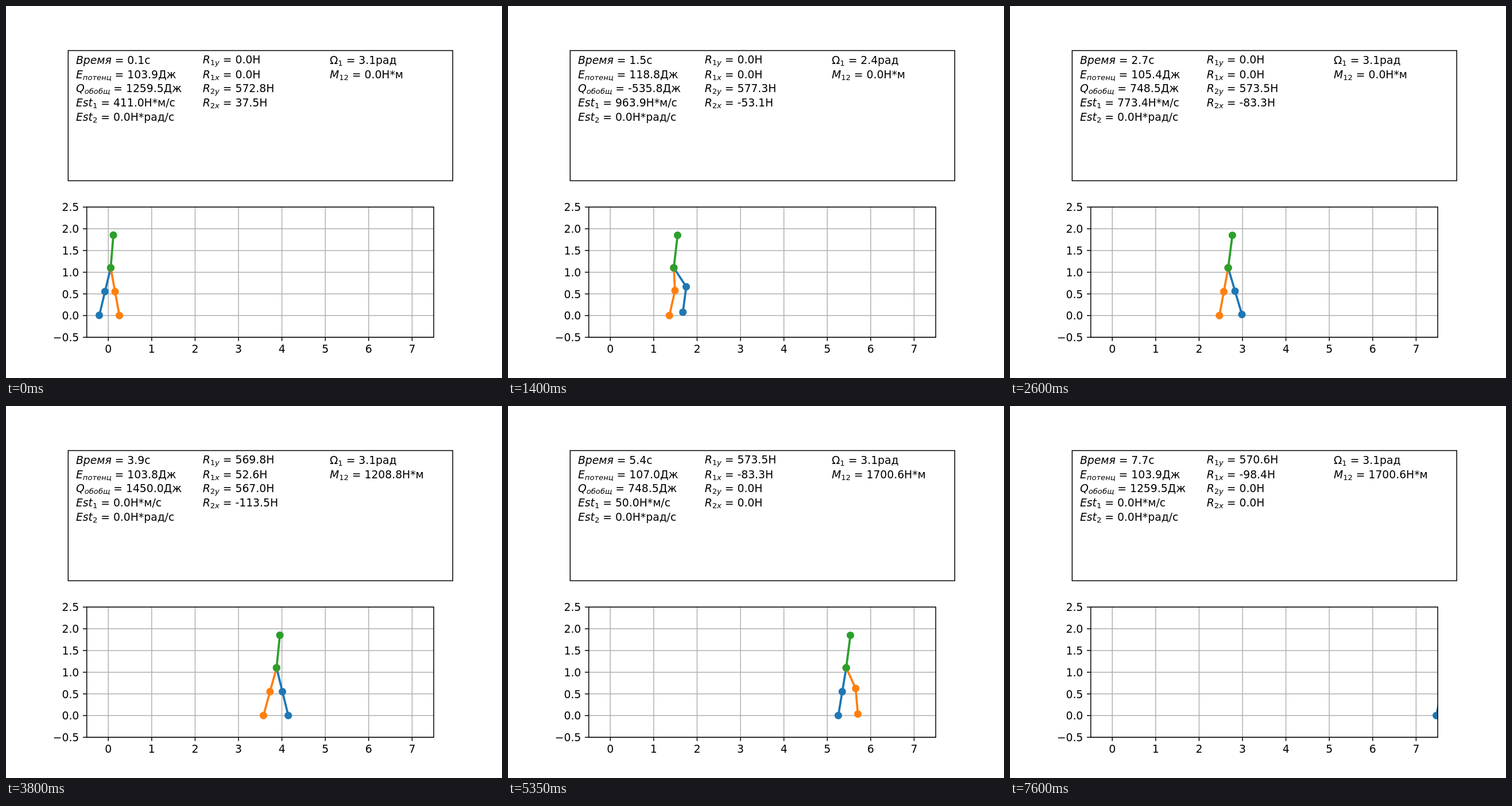
Write an HTML page that moves like this. It is 864 px wide and 648 px high and loops after 7650 ms.

```html
<!DOCTYPE html>
<html lang="ru">
<head>
<meta charset="utf-8">
<title>Модель ходьбы</title>
<style>
  html, body { margin: 0; width: 100%; height: 100%; overflow: hidden; background: #fff; }
  svg { display: block; }
  text { font: 18.75px "DejaVu Sans", sans-serif; white-space: pre; }
  .i { font-style: italic; }
  .sub { font-size: 13.125px; }
  .frame { fill: none; stroke: #000; stroke-width: 1.5; }
  .tick { stroke: #000; stroke-width: 1.5; }
  .grid { stroke: #b0b0b0; stroke-width: 1.5; }
  .limb polyline { fill: none; stroke: currentColor; stroke-width: 3.75; stroke-linejoin: round; }
  .limb circle { fill: currentColor; }
</style>
</head>
<body>
<svg width="864" height="648" viewBox="0 0 864 648">
  <defs><clipPath id="plot"><rect x="140.4" y="349.9" width="604.8" height="226.8"/></clipPath></defs>
  <rect class="frame" x="108.3" y="77.6" width="669.9" height="226.8"/>
  <g id="readout"></g>
  <g id="axes"></g>
  <g id="walker" clip-path="url(#plot)"></g>
  <rect class="frame" x="140.7" y="350.3" width="604.4" height="226.8"/>
</svg>
<script>
const STEP = 50, FRAMES = 153;
const STRIDE_FRAMES = 22, HALF = 11;   // the legs swap roles every HALF frames
const SCALE = 75.6, X0 = 178.2, Y0 = 539.2;
const SPEED = 1.0057, HIP_Y = 1.1, STRIDE = 1.1063;
const THIGH = 0.5228, SHIN = 0.592, TRUNK = 0.755;

const px = x => X0 + x * SCALE;
const py = y => Y0 - y * SCALE;
const wave = (x, period) => Math.cos(2 * Math.PI * x / period);
const byId = id => document.getElementById(id);

function add(parent, tag, attrs = {}) {
  const el = document.createElementNS('http://www.w3.org/2000/svg', tag);
  for (const key in attrs) el.setAttribute(key, attrs[key]);
  return parent.appendChild(el);
}

// Foot going from one foothold to the next; u is the part of the swing done
function foot(from, u) {
  u = Math.min(1, Math.max(0, u));
  const ramp = Math.min(1, u / 0.4);
  const advance = (u + (1 - Math.cos(Math.PI * u)) / 2) / 2;
  return [from + STRIDE * advance, 0.097 * Math.sin(Math.PI * u) * ramp * ramp * (3 - 2 * ramp)];
}

// Knee bends forward; a leg out of reach is drawn straight
function knee(hip, ankle) {
  const dx = ankle[0] - hip[0], dy = ankle[1] - hip[1], d = Math.hypot(dx, dy);
  if (d > THIGH + SHIN) return [hip[0] + dx / 2, hip[1] + dy / 2];
  const a = (THIGH ** 2 - SHIN ** 2 + d * d) / (2 * d);
  const h = Math.sqrt(Math.max(0, THIGH ** 2 - a * a));
  return [hip[0] + (dx * a - dy * h) / d, hip[1] + (dy * a + dx * h) / d];
}

function kneeAngle([hip, k, ankle]) {
  const up = [hip[0] - k[0], hip[1] - k[1]], down = [ankle[0] - k[0], ankle[1] - k[1]];
  const cos = (up[0] * down[0] + up[1] * down[1]) / Math.hypot(...up) / Math.hypot(...down);
  return Math.acos(Math.max(-1, cos));
}

function pose(n) {
  const t = n * STEP / 1000, lap = Math.floor(n / STRIDE_FRAMES);
  const phase = n % STRIDE_FRAMES * STEP / 1000;
  const hip = [SPEED * t + 0.005, HIP_Y];
  const leg = ankle => [hip, knee(hip, ankle), ankle];
  const lean = 0.071 + 0.026 * wave(n - 8.6, HALF);
  return {
    left: leg(foot(-0.278 + STRIDE * lap, phase / 0.49)),
    right: leg(foot(0.256 + STRIDE * lap, (phase - 0.55) / 0.51)),
    trunk: [hip, [hip[0] + lean, HIP_Y + Math.sqrt(TRUNK ** 2 - lean * lean)]]
  };
}

// Ground reaction of a foot, by frames since it landed
function reaction(age) {
  if (age > HALF) return { x: 0, y: 0 };
  return { x: 52.6 - 15.1 * age, y: 569.8 - 0.25 * age + 0.33 * age * (HALF - age) };
}

function measure(n, p) {
  const i = n % STRIDE_FRAMES, late = i - HALF;
  const lift = Math.max(p.left[2][1], p.right[2][1]);
  const r1 = reaction((i + HALF) % STRIDE_FRAMES), r2 = reaction(i);
  const leftSwings = late < 0;
  return {
    time: Math.round(n / 2) / 10,
    energy: 103.8 + 2600 * lift * lift,
    force: 250 + 1200 * wave(i, HALF),
    est1: leftSwings ? 980 * Math.sqrt(Math.sin(Math.PI * (i / HALF) ** 1.2))
                     : late && 50 * (HALF - 1 - late),
    est2: leftSwings ? 0 : late && 80.6 * Math.max(0, 9 - late),
    r1y: r1.y, r1x: r1.x, r2y: r2.y, r2x: r2.x,
    omega: kneeAngle(p.left),
    m12: leftSwings ? 0 : 1280 + 500 * wave(late - 9.5, HALF / 2)
  };
}

function label(x, y, name, sub, unit) {
  const el = add(byId('readout'), 'text', { x, y });
  el.innerHTML = name + (sub && `<tspan class="sub" dy="3.1">${sub}</tspan>`);
  const value = add(el, 'tspan', sub ? { dy: -3.1 } : {});
  return v => { value.textContent = ` = ${v.toFixed(1)}${unit}`; };
}

const it = s => `<tspan class="i">${s}</tspan>`;
const rowY = r => Math.floor(101.3 + 24.75 * r);
const show = {
  time: label(122, rowY(0), it('Время'), '', 'с'),
  energy: label(122, rowY(1), it('E'), it('потенц'), 'Дж'),
  force: label(122, rowY(2), it('Q'), it('обобщ'), 'Дж'),
  est1: label(122, rowY(3), it('Est'), '1', 'Н*м/с'),
  est2: label(122, rowY(4), it('Est'), '2', 'Н*рад/с'),
  r1y: label(342.7, rowY(0) - 1, it('R'), '1' + it('y'), 'Н'),
  r1x: label(342.7, rowY(1), it('R'), '1' + it('x'), 'Н'),
  r2y: label(342.7, rowY(2), it('R'), '2' + it('y'), 'Н'),
  r2x: label(342.7, rowY(3), it('R'), '2' + it('x'), 'Н'),
  omega: label(564, rowY(0), 'Ω', '1', 'рад'),
  m12: label(564, rowY(1), it('M'), '12', 'Н*м')
};

const axes = byId('axes');
const line = (cls, x1, y1, x2, y2) => add(axes, 'line', { class: cls, x1, y1, x2, y2 });
const tickText = (x, y, anchor, s) => {
  add(axes, 'text', { x, y, 'text-anchor': anchor }).textContent = s;
};
for (let v = 0; v <= 7; v++) {
  const x = px(v);
  line('grid', x, 350, x, 577);
  line('tick', x, 577, x, 583.5);
  tickText(x, 604, 'middle', v);
}
for (let v = -0.5; v <= 2.5; v += 0.5) {
  const y = py(v) + 0.1;
  line('grid', 140, y, 745, y);
  line('tick', 133.9, y, 140.4, y);
  tickText(127.3, Math.round(y) + 7, 'end', v.toFixed(1).replace('-', '−'));
}

function limb(color, joints) {
  const g = add(byId('walker'), 'g', { class: 'limb', color });
  const bone = add(g, 'polyline');
  const dots = Array.from({ length: joints }, () => add(g, 'circle', { r: 6.55 }));
  return points => {
    const pts = points.map(([x, y]) => [px(x), py(y)]);
    bone.setAttribute('points', pts.join(' '));
    dots.forEach((dot, j) => {
      dot.setAttribute('cx', pts[j][0]);
      dot.setAttribute('cy', pts[j][1]);
    });
  };
}
const limbs = { left: limb('#1f77b4', 3), right: limb('#ff7f0e', 3), trunk: limb('#2ca02c', 2) };

function draw(n) {
  const p = pose(n), values = measure(n, p);
  for (const key in limbs) limbs[key](p[key]);
  for (const key in show) show[key](values[key]);
}

const start = performance.now();
let last = 0;
function tick() {
  const n = Math.floor((performance.now() - start) / STEP) % FRAMES + 1;
  if (n !== last) draw(last = n);
  requestAnimationFrame(tick);
}
tick();
</script>
</body>
</html>
```
